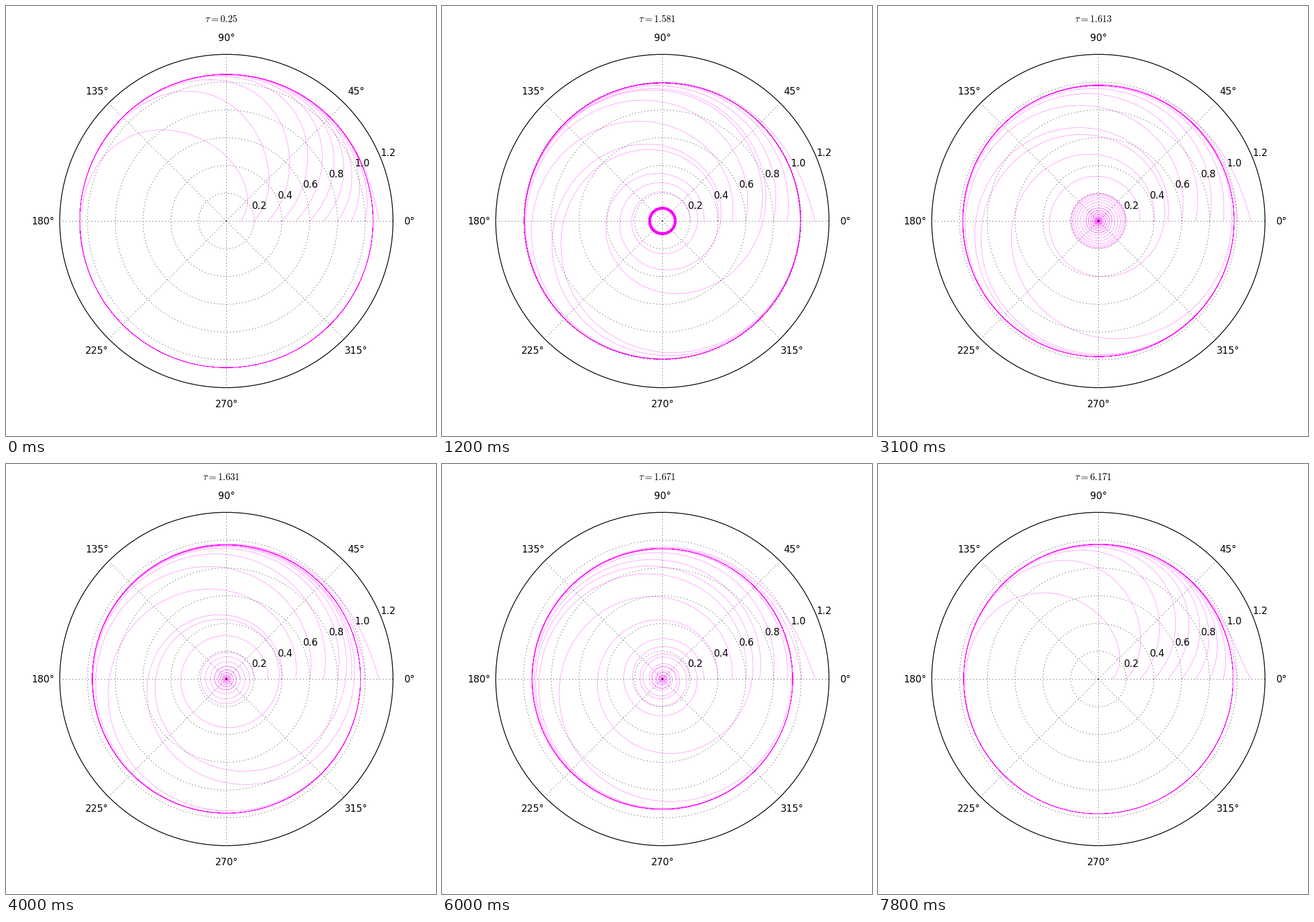
Write a matplotlib script that moves like this. It is 748 px wide and 748 px high and loops after 7900 ms.

```python
import matplotlib.pyplot as plt
import numpy as np
from matplotlib.animation import FuncAnimation

SIZE, DPI = 748, 100
CX, CY, R = 0.5125 * SIZE, 0.5 * SIZE, 0.3875 * SIZE
RMAX = 1.2
DT, T_END = 0.05, 200

plt.rcParams.update({"font.family": "DejaVu Sans", "mathtext.fontset": "cm"})


def tau_values():
    """Coarse steps, a fine sweep past pi/2, then coarse steps again."""
    coarse = np.arange(1, 7) * 0.25
    fine = np.pi / 2 + 0.002 * np.arange(51)
    extra = [1.58, 1.59, 1.60, 1.61]
    middle = np.sort(np.concatenate([fine, extra]))
    tail = fine[-1] + 0.25 * np.arange(1, 19)
    return np.concatenate([coarse, middle, tail])


def integrate(taus, starts):
    """RK4 for r' = r (cos tau + r^2 sin tau - r^4), for all tau at once."""
    c, s = np.cos(taus)[:, None], np.sin(taus)[:, None]

    def f(r):
        q = r * r
        return r * (c + q * (s - q))

    n = int(T_END / DT) + 1
    path = np.empty((n, len(taus), len(starts)))
    path[0] = starts
    for i in range(n - 1):
        r = path[i]
        k1 = f(r)
        k2 = f(r + DT / 2 * k1)
        k3 = f(r + DT / 2 * k2)
        k4 = f(r + DT * k3)
        path[i + 1] = r + DT / 6 * (k1 + 2 * k2 + 2 * k3 + k4)
    return path


taus = tau_values()
starts = np.arange(1, 12) / 10
radii = integrate(taus, starts)
theta = np.arange(len(radii)) * DT  # the phase turns at unit speed

fig = plt.figure(figsize=(SIZE / DPI, SIZE / DPI), dpi=DPI, facecolor="white")
ax = fig.add_axes([0.125, 0.1, 0.775, 0.8], projection="polar")
ax.set_ylim(0, RMAX)
ax.set_xticks(np.radians(np.arange(0, 360, 45)))
ax.set_yticks(np.arange(1, 6) * 0.2)
ax.tick_params(labelbottom=False, labelleft=False)
ax.grid(True, color="black", lw=0.5, ls=(0, (2, 6)))
ax.set_axisbelow(False)
ax.spines["polar"].set_linewidth(1)


def label(x, y, text, ha="center"):
    return fig.text(x / SIZE, 1 - y / SIZE, text, ha=ha, va="baseline",
                    fontsize=12, color="black")


for deg in range(0, 360, 45):
    a = np.radians(deg)
    label(CX + 1.1 * R * np.cos(a), CY - 1.1 * R * np.sin(a) + 5.6, f"{deg}°")

a = np.radians(22.5)
for k in range(1, 7):
    d = k * R / 6
    label(CX + d * np.cos(a), CY - d * np.sin(a) - 2.5, f"{k / 5:.1f}", "left")

title = label(374.5, 28, "")
lines = [ax.plot([], [], color="magenta", lw=0.25)[0] for _ in starts]
ax.set_ylim(0, RMAX)


def draw(i):
    title.set_text(rf"$\tau= {round(float(taus[i]), 3)}$")
    for j, line in enumerate(lines):
        r = radii[:, i, j]
        # settled orbits only repeat, so a few turns of them are enough
        moving = np.flatnonzero(np.abs(r - r[-1]) > 0.002)
        end = (moving[-1] if len(moving) else 0) + int(60 / DT)
        line.set_data(theta[:end], r[:end])
    return lines + [title]


anim = FuncAnimation(fig, draw, frames=len(taus), interval=100,
                     init_func=lambda: draw(0), repeat=True, repeat_delay=0,
                     blit=False)
plt.show()
```
